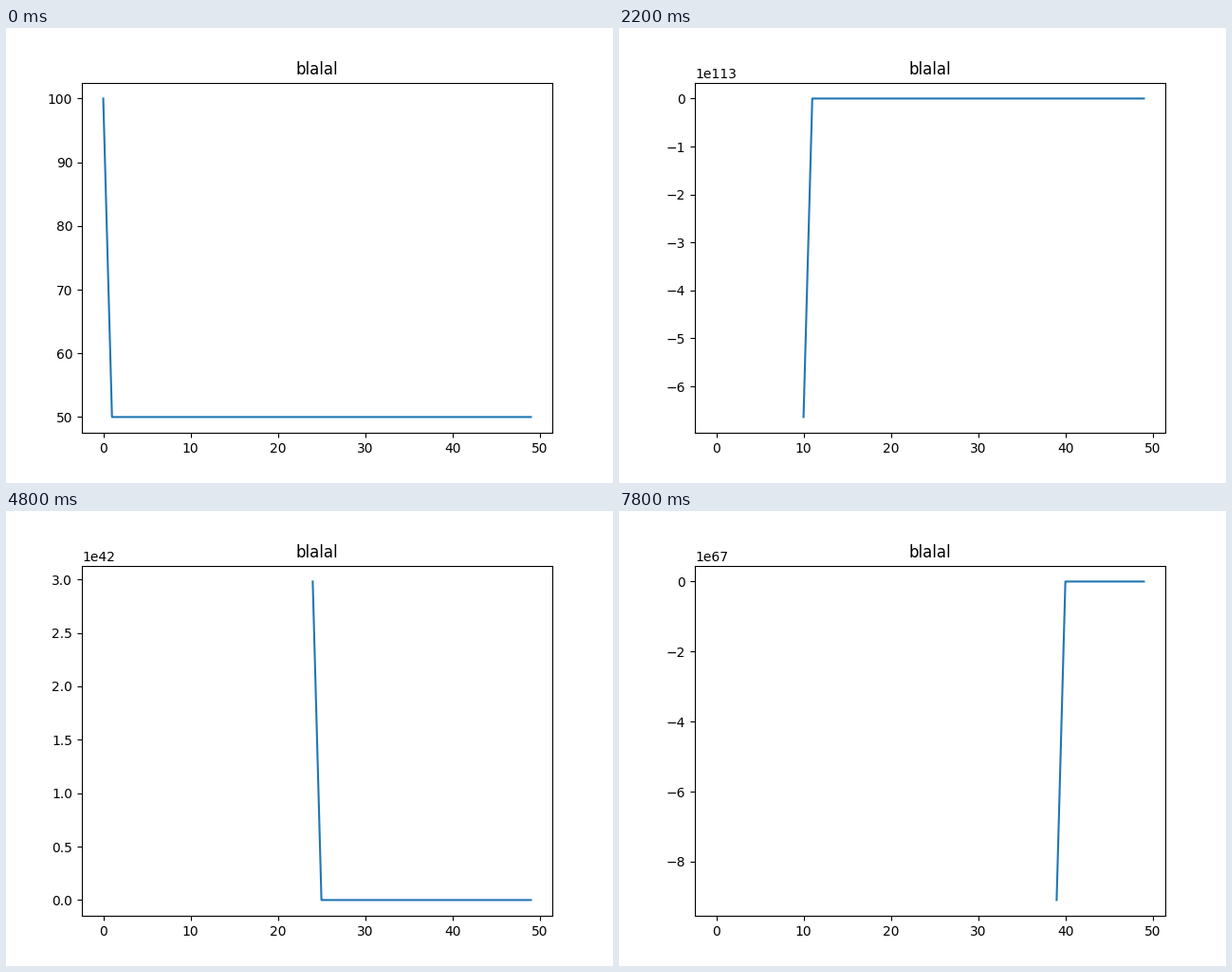
These frames come from a looping animation (640x480 px, 8000 ms). A matplotlib script:

```python
import numpy as np
import matplotlib.pyplot as plt
from matplotlib.animation import FuncAnimation

CELLS = 50
STEPS = 40


def step(u):
    """One explicit step of the nonlinear advection scheme, left edge fixed."""
    new = u.copy()
    new[1:] = u[1:] + u[1:] * (u[1:] - u[:-1])
    return new


def solve():
    u = np.full(CELLS, 50.0)
    u[0] = 100.0
    states = [u]
    # The scheme is unstable: cells behind the front overflow and drop out.
    with np.errstate(over="ignore", invalid="ignore"):
        for _ in range(STEPS - 1):
            states.append(step(states[-1]))
    return [np.where(np.isfinite(s), s, np.nan) for s in states]


states = solve()
x = np.arange(CELLS)
fig, ax = plt.subplots(figsize=(6.4, 4.8), dpi=100)


def draw(k):
    ax.clear()
    ax.plot(x, states[k])
    ax.set_xlim(-2.45, 51.45)
    ax.set_title("blalal")


anim = FuncAnimation(fig, draw, frames=STEPS, init_func=lambda: draw(0),
                     interval=200, repeat=True, repeat_delay=0)
plt.show()
```
